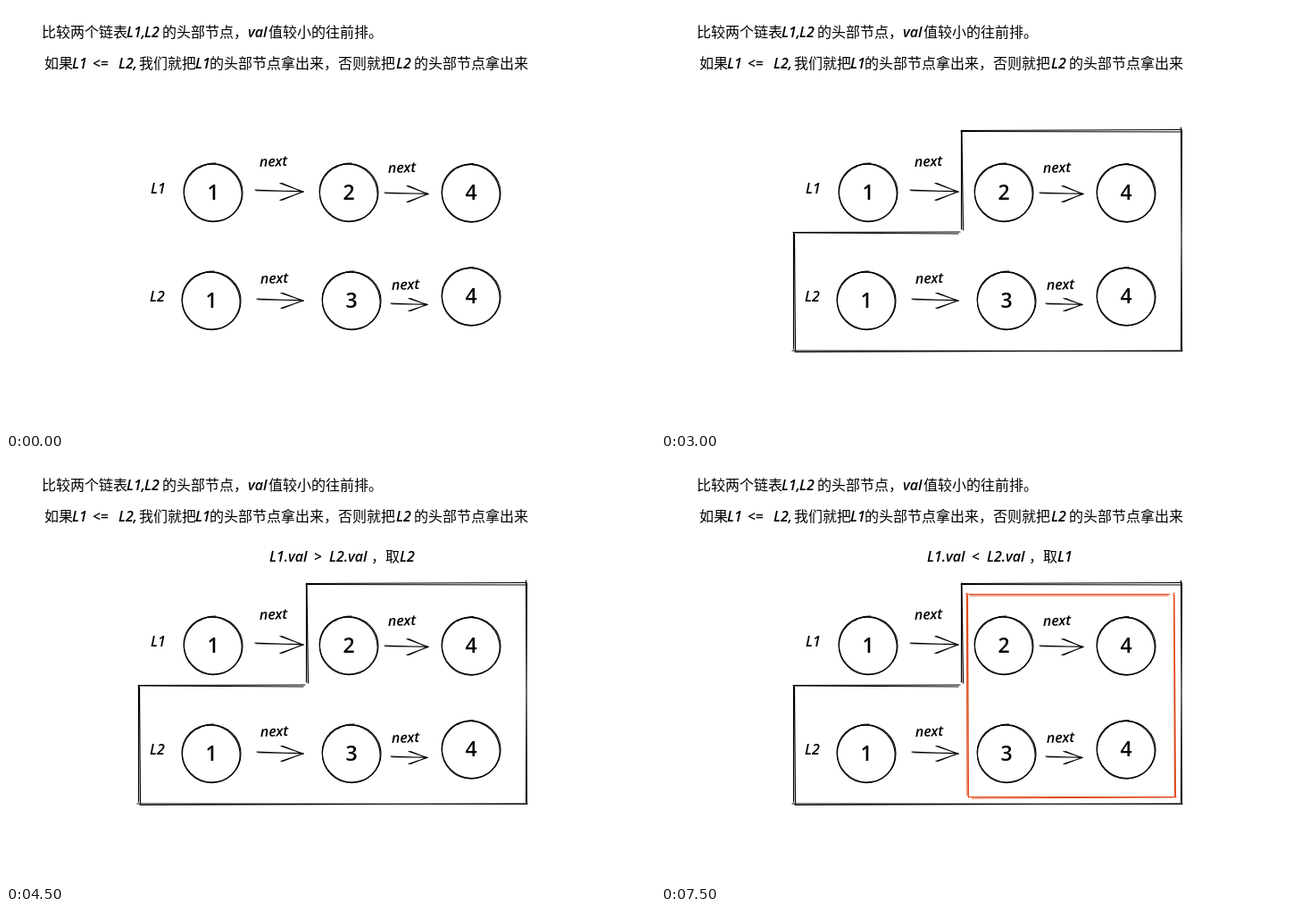
An HTML page for the animation above (8 s loop, 727 by 476 pixels).

```html
<!DOCTYPE html>
<html lang="zh-CN">
<head>
<meta charset="utf-8">
<style>
html, body { margin: 0; width: 100%; height: 100%; overflow: hidden; background: #fff; }
svg { display: block; }
text { font: 16px "Noto Sans CJK SC", "Noto Sans CJK", sans-serif; white-space: pre; }
.hand { font: italic 600 16px "Open Sans", "Noto Sans", sans-serif; }
.digit { font: 600 23px "Open Sans", "Noto Sans", sans-serif; text-anchor: middle; }
path, ellipse { fill: none; stroke: #000; stroke-width: 1.15; stroke-linecap: round; }
.red path { stroke: #e04a1c; }
.timed { opacity: 0; }
</style>
</head>
<body>
<svg id="stage" width="727" height="476" viewBox="0 0 727 476"></svg>
<script>
const LOOP = 8000;
const stage = document.getElementById('stage');

function add(parent, tag, attrs = {}, content = '') {
  const el = document.createElementNS('http://www.w3.org/2000/svg', tag);
  for (const key in attrs) el.setAttribute(key, attrs[key]);
  el.textContent = content;
  parent.append(el);
  return el;
}

const group = name => add(stage, 'g', { class: name });
const stroke = (parent, d) => add(parent, 'path', { d });

// Latin runs use the slanted face, Chinese runs the upright one.
function line(parent, y, runs) {
  for (const [x, s] of runs) {
    const latin = s.charCodeAt(0) < 128;
    add(parent, 'text', latin ? { x, y, class: 'hand' } : { x, y }, s);
  }
}

// A sketched circle: two slightly different turns and an overshoot at the top.
function node(x, y, value) {
  const g = add(stage, 'g', { transform: `translate(${x} ${y})` });
  add(g, 'ellipse', { cx: 0.2, cy: 0.2, rx: 32.8, ry: 32.4 });
  add(g, 'ellipse', { cx: -0.3, cy: 0.2, rx: 32.9, ry: 31.6, transform: 'rotate(35)' });
  stroke(g, 'M-15 -28 Q-8 -33 3 -33');
  add(g, 'text', { x: 0, y: 7.5, class: 'digit' }, value);
}

function arrow(x, y, tipX, tipY, back, spread) {
  stroke(stage, `M${x} ${y} L${tipX} ${tipY} M${x + 1} ${y + 0.6} L${tipX - 1} ${tipY - 0.4}`);
  for (const side of [-1, 1]) {
    const bx = tipX - back, by = tipY + side * spread;
    stroke(stage, `M${bx} ${by} L${tipX} ${tipY} M${bx + 2} ${by} L${tipX - 1} ${tipY}`);
  }
}

function next(x, y) {
  add(stage, 'text', { x, y, class: 'hand', transform: `rotate(-2 ${x} ${y})` }, 'next');
}

function show(el, from, to) {
  el.classList.add('timed');
  const frames = [
    { offset: 0, opacity: 0 },
    { offset: from / LOOP, opacity: 1 },
    { offset: to / LOOP, opacity: to < LOOP ? 0 : 1 }
  ];
  if (to < LOOP) frames.push({ offset: 1, opacity: 0 });
  frames.forEach(f => f.easing = 'steps(1, end)');
  el.animate(frames, { duration: LOOP, iterations: Infinity });
}

line(stage, 35, [
  [40, '比较两个链表'], [135, 'L1,'], [155, 'L2'], [175, '的头部节点，'],
  [271, 'val'], [294, '值较小的往前排。']
]);
line(stage, 70, [
  [43, '如果'], [74, 'L1'], [97, '<='], [126, 'L2,'], [149, '我们就把'],
  [212, 'L1'], [228, '的头部节点拿出来，否则就把'], [437, 'L2'], [457, '的头部节点拿出来']
]);

line(stage, 210, [[162, 'L1']]);
line(stage, 331, [[161, 'L2']]);

node(232, 209, 1);
node(384, 209, 2);
node(521, 209.5, 4);
node(230, 330, 1);
node(387, 330, 3);
node(521, 325.5, 4);

arrow(279, 206, 333, 208, 26, 9.5);
arrow(424, 209, 473, 210.5, 24, 9);
arrow(281, 328, 333, 330, 25, 8.5);
arrow(431, 333, 472, 334.5, 21, 7);

next(284, 180);
next(428, 187);
next(285, 311);
next(432, 318);

const rest = group('rest');
stroke(rest, 'M337 139.5 L583 138.5 M336 140.5 L582 141');
stroke(rest, 'M582.5 136 L583.5 386 M583.5 139 L582.5 385');
stroke(rest, 'M584 386.5 L147 386 M582 386 L150 387.5');
stroke(rest, 'M148.5 254 L148.5 384 M149.5 255 L150.5 386');
stroke(rest, 'M148 253.5 L335 253 M150 254 L333 255');
stroke(rest, 'M336.5 139 L336.5 250 M337 141 L338.5 251');
show(rest, 3000, LOOP);

const heads = group('red');
stroke(heads, 'M342 151.5 L570 151.5 M346 153 L568 153');
stroke(heads, 'M574.5 150 L575.5 378 M575 152 L576.5 379');
stroke(heads, 'M577 378.5 L345 378.5 M574 379 L348 380');
stroke(heads, 'M342.5 150 L343 377 M343.5 153 L344.5 379');
show(heads, 6000, LOOP);

// [start, end, left edge, sign, sign width, winner]
const captions = [
  [1500, 3000, 288, '===', 29, 'L1'],
  [4500, 6000, 295, '>', 8, 'L2'],
  [7500, LOOP, 298, '<', 8, 'L1']
];
for (const [from, to, x, sign, width, winner] of captions) {
  const g = group('caption');
  const right = x + 58 + width;
  line(g, 115, [
    [x, 'L1.val'], [x + 50, sign], [right + 1, 'L2.val'],
    [right + 48, '，取'], [right + 80, winner]
  ]);
  show(g, from, to);
}
</script>
</body>
</html>
```
